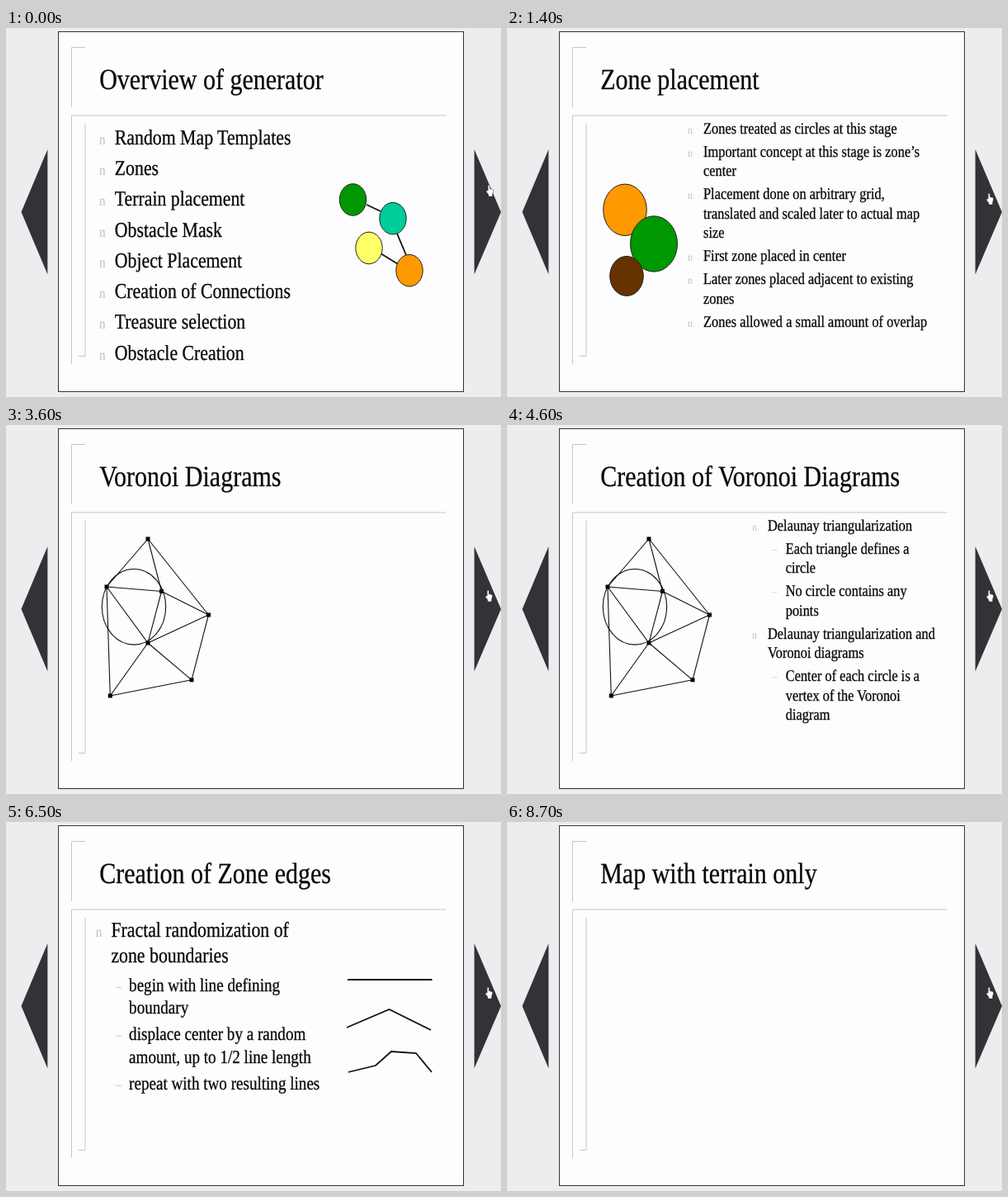
Write an HTML page that moves like this. It is 600 px wide and 447 px high and loops after 9000 ms.

```html
<!DOCTYPE html>
<html lang="en">
<head>
<meta charset="utf-8">
<title>Map generator slides</title>
<style>
  html, body { margin: 0; width: 100%; height: 100%; overflow: hidden; background: #edecee; }
  svg { display: block; width: 100%; height: 100%; }
  text {
    font-family: "Liberation Serif", "Times New Roman", serif;
    fill: #080808; stroke: #080808; stroke-width: .25; text-rendering: geometricPrecision;
  }
  .mark { fill: #c0c0c0; stroke: none; }
  .rule { fill: none; stroke: #c6c5c8; }
  .shape { stroke: #222; stroke-linejoin: round; }
  .wire { fill: none; stroke: #111; stroke-width: 1.1; }
  .thick { fill: none; stroke: #111; stroke-width: 1.8; }
  .slide { visibility: hidden; }
  .hand { fill: #fff; stroke: #343236; stroke-width: .5; animation: hand 9s linear infinite; }
  @keyframes hand {
    0%, 1.1% { transform: translate(1px, -10px); }
    4.44%, 100% { transform: none; }
  }
</style>
</head>
<body>
<svg viewBox="0 0 600 447" preserveAspectRatio="none">
  <g fill="#343236">
    <path d="M50.4 147L18.5 223L50.4 298.5Z"/>
    <path d="M567.6 147L600 223L567.6 298.5Z"/>
  </g>
  <rect x="63.5" y="4.5" width="491" height="436" fill="#fdfcfe" stroke="#333"/>
  <path class="rule" d="M79.5 96V23.5H96M79.5 407V106H533.5M96 116V397.5H88"/>
  <g id="deck"></g>
  <path class="hand" d="M583.2 207V201.2Q584.3 199.2 585.4 201.2V204.5L588.6 205.4Q589.9 205.8 589.7 207.4L588.6 211.5V214H583.9V212L581.2 208.4Q581 206.4 583.2 207Z"/>
</svg>
<script>
const LOOP = 9000;
const ASPECT = 1.18;  // the deck is shown taller than 4:3
const BIG = 21.8, MID = 19.1, SMALL = 16.4;

const text = (x, y, size, content, cls = '') =>
  `<text class="${cls}" font-size="${size}" transform="translate(${x} ${y}) scale(1 ${ASPECT})">${content}</text>`;

const title = (...lines) =>
  lines.map((line, i) => text(113.2, (lines.length > 1 ? 53 : 74.3) + i * 41, 30, line)).join('');

// Paragraphs break at "|"; a leading "-" makes a sub-item.
function bullets(x, y, size, paragraphs, subSize = size, leading = 1.425) {
  let out = '', last = 0;
  for (const paragraph of paragraphs) {
    const sub = paragraph[0] === '-';
    const now = sub ? subSize : size;
    const left = sub ? x + 21.7 : x;
    if (last) y += leading * (last + now) / 2 + now * .285;
    out += sub ? text(left - 16, y - 1, now * .7, '–', 'mark')
               : text(left - 18.7, y, now * .7, 'n', 'mark');
    paragraph.replace('-', '').split('|').forEach((line, i) => {
      if (i) y += leading * now;
      out += text(left, y, now, line);
    });
    last = now;
  }
  return out;
}

const oval = (x, y, rx, ry, fill) =>
  `<ellipse class="shape" cx="${x}" cy="${y}" rx="${rx}" ry="${ry}" fill="${fill}"/>`;
const path = (cls, d, fill = 'none') => `<path class="${cls}" d="${d}" fill="${fill}"/>`;

// Octagon inside a box, its corners cut at 45° before the vertical stretch.
function octagon(x, y, w, h, fill) {
  const cx = w * .293, cy = cx * ASPECT;
  return path('shape', `M${x + cx} ${y}h${w - 2 * cx}l${cx} ${cy}v${h - 2 * cy}l${-cx} ${cy}
    h${2 * cx - w}l${-cx} ${-cy}v${2 * cy - h}Z`, fill);
}

const GREEN = '#009800', ORANGE = '#ff9900', PURPLE = '#6600ff';

const graph = path('thick', 'M437 214L454 222M474 249L485 275M454 273L475 286') +
  oval(420.5, 208, 16.2, 19.3, GREEN) + oval(469, 230.7, 16.2, 19.3, '#00cc99') +
  oval(440, 266.5, 16.2, 19.3, '#ffff66') + oval(489, 293.8, 16.2, 19.3, ORANGE);

const zones = oval(143, 220.3, 26.3, 31.2, ORANGE) + oval(178, 261.5, 28.5, 33.7, GREEN) +
  oval(145, 300.5, 20.3, 24, '#663300');

const extraZones = oval(186, 208.3, 16, 19.2, PURPLE) + oval(124.5, 266.5, 12, 14.4, PURPLE) +
  oval(180, 312.5, 14, 16.6, PURPLE);

const points = { a: [172, 138], b: [122, 196], c: [188.5, 201.5], d: [245.5, 230],
                 e: [172, 264], f: [225, 308.8], g: [126.3, 328] };
const triangles = path('wire', 'ab ac ad bc be cd ce de bg eg ef df gf'.split(' ')
    .map(([p, q]) => `M${points[p]}L${points[q]}`).join('')) +
  Object.values(points).map(([x, y]) => `<rect x="${x - 2.5}" y="${y - 2.5}" width="5" height="5"/>`).join('') +
  `<ellipse class="wire" cx="155" cy="220.3" rx="38.7" ry="45.8"/>`;

const edges = path('thick', 'M414 191H516.5M413 249L464.5 227L515 252M415 303L448 295L467 278L497 280L516 303');

const islands =
  octagon(413.7, 126, 92.5, 114.5) + octagon(430, 143, 60.5, 79.5, GREEN) +
  octagon(410.7, 272, 92.5, 115) +
  path('shape', `M430 295L436 297L441 292L447 296L457 297L461 291L471 292L474 298L479 297L481 303
    L479 310L487 312L490 320L494 327L488 333L491 341L490 350L481 353L475 353L472 361L470 366
    L470 373L464 374L462 380L456 383L449 378L444 373L440 373L438 366L433 361L434 352L427 345
    L430 334L424 323L427 314L425 304Z`, GREEN);

const slides = [
  [0, title('Overview of generator') + graph + bullets(131.8, 140.7, BIG, [
    'Random Map Templates', 'Zones', 'Terrain placement', 'Obstacle Mask', 'Object Placement',
    'Creation of Connections', 'Treasure selection', 'Obstacle Creation'])],
  [100, title('Random Map Templates') + graph],
  [1300, title('Zone placement') + zones + bullets(238, 128, SMALL, [
    'Zones treated as circles at this stage',
    'Important concept at this stage is zone’s|center',
    'Placement done on arbitrary grid,|translated and scaled later to actual map|size',
    'First zone placed in center',
    'Later zones placed adjacent to existing|zones',
    'Zones allowed a small amount of overlap'])],
  [1700, title('Zone Placement continued') + zones + extraZones + bullets(270.8, 137.7, SMALL, [
    'Minimize overall width and height of|map',
    'For two level maps, each level must|have at least one zone',
    'Maximize number of adjacencies to|connected zones',
    'Zone placement done 5 times, like|“shaking a box”',
    'Extra water and rock zones placed|after normal zones'])],
  [3600, title('Voronoi Diagrams') + triangles],
  [4600, title('Creation of Voronoi Diagrams') + triangles + bullets(316, 128, SMALL, [
    'Delaunay triangularization',
    '-Each triangle defines a|circle',
    '-No circle contains any|points',
    'Delaunay triangularization and|Voronoi diagrams',
    '-Center of each circle is a|vertex of the Voronoi|diagram'])],
  [5500, title('Creation of Voronoi', 'Diagrams continued') + triangles],
  [6500, title('Creation of Zone edges') + edges + bullets(127.4, 138.9, BIG, [
    'Fractal randomization of|zone boundaries',
    '-begin with line defining|boundary',
    '-displace center by a random|amount, up to 1/2 line length',
    '-repeat with two resulting lines'], MID)],
  [7600, title('Differences on an Islands map') + islands + bullets(127.4, 136, BIG, [
    'Zone boundaries not|randomized',
    'Internal boundary|between land and sea|within each zone',
    'Internal boundary|displaced from actual|boundary and|randomized'], BIG, 1.284)],
  [8700, title('Map with terrain only')],
];

const percent = ms => (ms / LOOP * 100).toFixed(4) + '%';
let css = '', deck = '';
slides.forEach(([start, content], i) => {
  const end = i + 1 < slides.length ? slides[i + 1][0] : LOOP;
  css += `@keyframes slide${i} {
    0% { visibility: ${start ? 'hidden' : 'visible'}; }
    ${percent(start)} { visibility: visible; }
    ${percent(end)} { visibility: hidden; } }\n`;
  deck += `<g class="slide" style="animation: slide${i} ${LOOP}ms step-end infinite">${content}</g>`;
});
document.head.append(Object.assign(document.createElement('style'), { textContent: css }));
document.getElementById('deck').innerHTML = deck;
</script>
</body>
</html>
```
